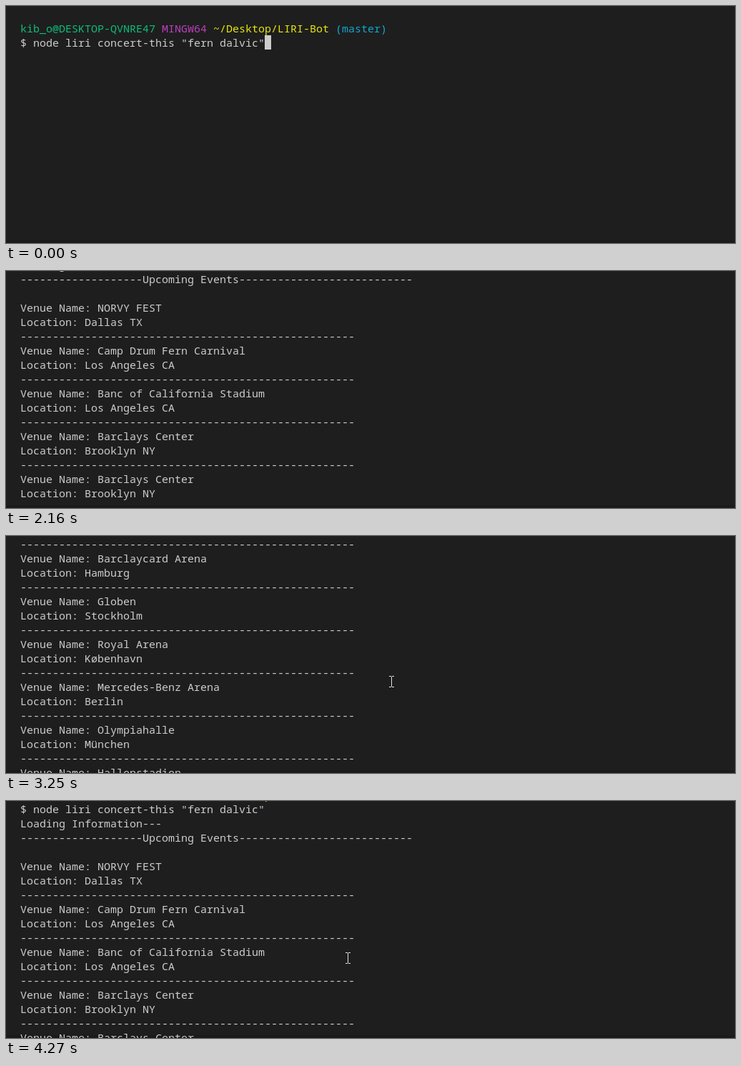
Animation, 1020 px wide and 332 px high, one loop 4580 ms. Source, as an HTML page:

```html
<!DOCTYPE html>
<html lang="en">
<head>
<meta charset="utf-8">
<title>Terminal session</title>
<style>
  html, body { margin: 0; width: 100%; height: 100%; overflow: hidden; background: #1e1e1e; }

  #stage { position: relative; width: 1020px; height: 332px; overflow: hidden; background: #1e1e1e; }
  #edge { position: absolute; left: 0; right: 0; bottom: 0; height: 4px; background: #1a1a1a; }

  /* One row is 20px tall, one character 9px wide */
  #output {
    position: absolute; left: 20px; top: 1px; width: 980px; margin: 0; overflow: hidden;
    font: 15px/20px "Noto Sans Mono", "Liberation Mono", monospace;
    font-variant-ligatures: none; color: #ccc;
    animation: scroll 4.58s step-end infinite;
  }
  .user { color: #0dbc79; }
  .sys { color: #bc3fbc; }
  .path { color: #e5e510; }
  .branch { color: #11a8cd; }

  #caret {
    position: absolute; left: 0; top: 0; width: 9px; height: 20px; background: #ccc;
    animation: caret 4.58s step-end infinite;
  }
  #mouse {
    position: absolute; left: 0; top: 0; width: 7px; height: 16px; fill: #e4e4e4;
    animation: mouse 4.58s step-end infinite;
  }

  /* height reveals printed rows, transform picks the top row */
  @keyframes scroll {
    0%      { height: 60px;   transform: translateY(0); }
    33.842% { height: 80px;   transform: translateY(0); }
    47.161% { height: 400px;  transform: translateY(-80px); }
    48.908% { height: 860px;  transform: translateY(-540px); }
    52.183% { height: 1300px; transform: translateY(-980px); }
    70.960% { height: 1300px; transform: translateY(-820px); }
    74.235% { height: 1300px; transform: translateY(-780px); }
    75.982% { height: 1300px; transform: translateY(-740px); }
    77.510% { height: 1300px; transform: translateY(-700px); }
    79.257% { height: 1300px; transform: translateY(-660px); }
    82.751% { height: 1300px; transform: translateY(-540px); }
    84.497% { height: 1300px; transform: translateY(-360px); }
    86.244% { height: 1300px; transform: translateY(-180px); }
    93.231%, 100% { height: 1300px; transform: translateY(-40px); }
  }

  @keyframes caret {
    0%      { opacity: 1; transform: translate(362px, 41px); }
    28.820% { opacity: 1; transform: translate(20px, 61px); }
    33.842% { opacity: 1; transform: translate(20px, 81px); }
    47.161%, 100% { opacity: 0; transform: translate(20px, 81px); }
  }

  @keyframes mouse {
    0%      { opacity: 0; transform: translate(461px, 128px); }
    1.528%  { opacity: 1; transform: translate(461px, 128px); }
    3.275%  { opacity: 1; transform: translate(514px, 96px); }
    4.803%  { opacity: 1; transform: translate(557px, 70px); }
    9.825%  { opacity: 1; transform: translate(604px, 58px); }
    11.572% { opacity: 1; transform: translate(560px, 86px); }
    13.318% { opacity: 1; transform: translate(498px, 118px); }
    15.065% { opacity: 1; transform: translate(447px, 139px); }
    16.812% { opacity: 0; transform: translate(447px, 139px); }
    55.895% { opacity: 1; transform: translate(1004px, 168px); }
    59.170% { opacity: 1; transform: translate(982px, 164px); }
    60.917% { opacity: 1; transform: translate(898px, 161px); }
    62.445% { opacity: 1; transform: translate(790px, 164px); }
    64.192% { opacity: 1; transform: translate(690px, 172px); }
    65.938% { opacity: 1; transform: translate(610px, 182px); }
    67.467% { opacity: 1; transform: translate(560px, 190px); }
    69.213% { opacity: 1; transform: translate(540px, 195px); }
    70.960% { opacity: 1; transform: translate(536px, 196px); }
    74.235% { opacity: 1; transform: translate(524px, 199px); }
    75.982% { opacity: 1; transform: translate(510px, 203px); }
    77.510% { opacity: 1; transform: translate(496px, 207px); }
    79.257% { opacity: 1; transform: translate(483px, 210px); }
    82.751% { opacity: 1; transform: translate(480px, 210px); }
    84.497% { opacity: 1; transform: translate(478px, 211px); }
    86.244% { opacity: 1; transform: translate(476px, 211px); }
    89.956%, 100% { opacity: 1; transform: translate(475px, 212px); }
  }
</style>
</head>
<body>
<div id="stage">
  <div id="edge"></div>
  <pre id="output"></pre>
  <div id="caret"></div>
  <svg id="mouse" viewBox="0 0 7 16" shape-rendering="crispEdges">
    <path d="M0 0h3v1H0zM4 0h3v1H4zM3 1h1v14H3zM0 15h3v1H0zM4 15h3v1H4z"/>
  </svg>
</div>
<script>
  const venues = [
    ["NORVY FEST", "Dallas TX"],
    ["Camp Drum Fern Carnival", "Los Angeles CA"],
    ["Banc of California Stadium", "Los Angeles CA"],
    ["Barclays Center", "Brooklyn NY"],
    ["Barclays Center", "Brooklyn NY"],
    ["Riverside Arena", "Dublin"],
    ["Northgate Arena", "Manchester"],
    ["Lakeside Hall", "Glasgow"],
    ["Grand Dome", "London"],
    ["Accorhotels Arena", "Paris"],
    ["Ziggo Dome", "Amsterdam"],
    ["Ziggo Dome", "Amsterdam"],
    ["Barclaycard Arena", "Hamburg"],
    ["Globen", "Stockholm"],
    ["Royal Arena", "København"],
    ["Mercedes-Benz Arena", "Berlin"],
    ["Olympiahalle", "München"],
    ["Hallenstadion", "Zürich"],
    ["Koenig Pilsner Area", "Oberhausen"],
    ["Sportpaleis Antwerpen", "Antwerpen"]
  ];

  const dashes = n => "-".repeat(n);
  const span = (kind, text) => `<span class="${kind}">${text}</span>`;

  const prompt = [
    span("user", "kib_o@DESKTOP-QVNRE47"),
    span("sys", "MINGW64"),
    span("path", "~/Desktop/LIRI-Bot"),
    span("branch", "(master)")
  ].join(" ");

  const rows = [
    " ",
    prompt,
    '$ node liri concert-this "fern dalvic"',
    "Loading Information---",
    dashes(19) + "Upcoming Events" + dashes(27),
    " "
  ];
  for (const [name, place] of venues) {
    rows.push("Venue Name: " + name, "Location: " + place, dashes(52));
  }
  document.getElementById("output").innerHTML = rows.join("\n");
</script>
</body>
</html>
```
